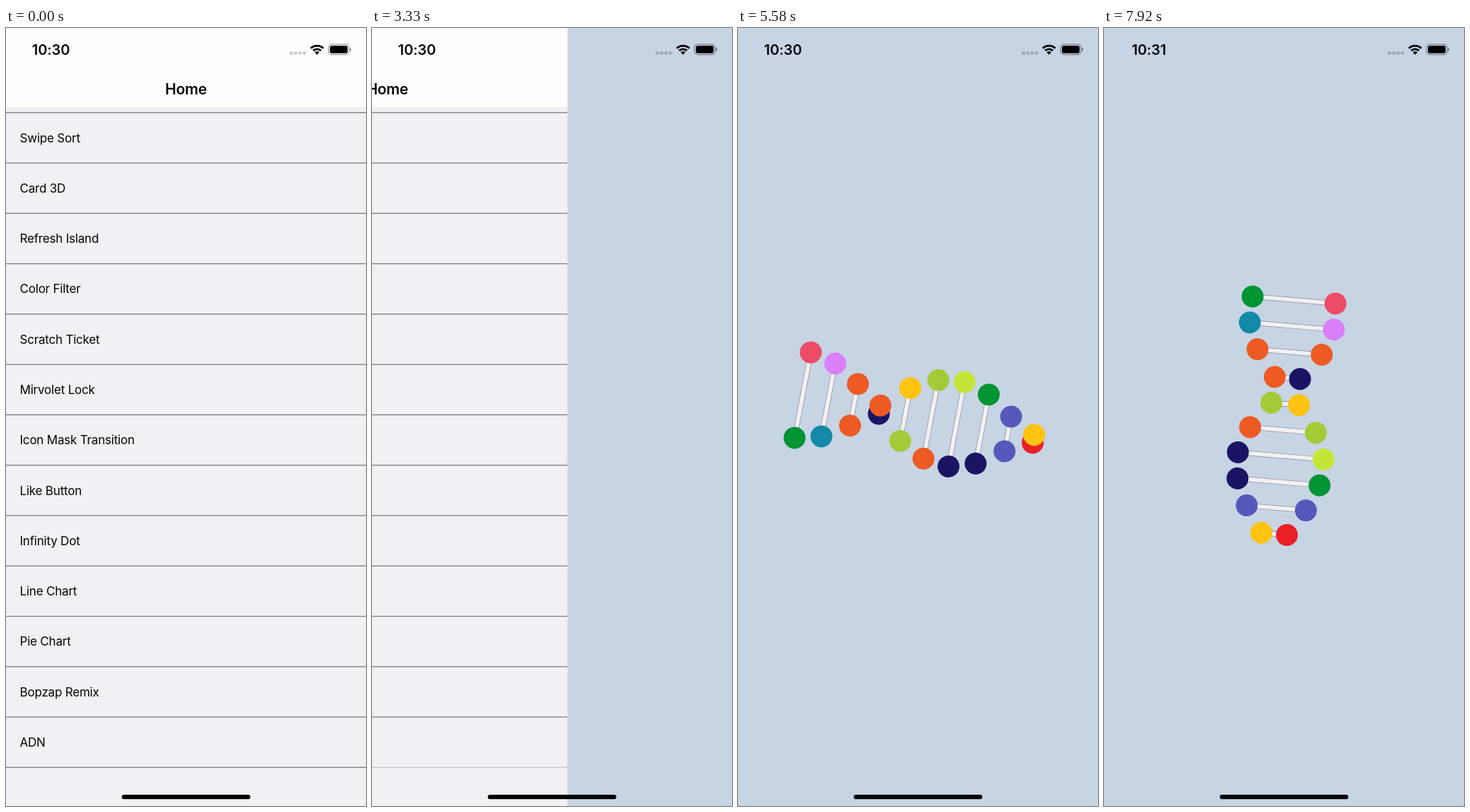
Animation of 509x1101 px, one loop 8 s. Source, as an HTML page with a canvas:

```html
<!DOCTYPE html>
<html lang="en">
<head>
<meta charset="utf-8">
<title>Helix</title>
<style>
  html, body { margin: 0; width: 100%; height: 100%; overflow: hidden; background: #c7d4e4; }
  canvas { display: block; width: 509px; height: 1101px; }
</style>
</head>
<body>
<canvas id="stage"></canvas>
<script>
const W = 509, H = 1101, LOOP = 8000;
const canvas = document.getElementById('stage');
const ctx = canvas.getContext('2d');
const dpr = window.devicePixelRatio || 1;
canvas.width = W * dpr;
canvas.height = H * dpr;

const FONT = 'Inter, "Liberation Sans", sans-serif';
const BLUE = '#c7d4e4';
const ROWS = ['Swipe Sort', 'Card 3D', 'Refresh Island', 'Color Filter', 'Scratch Ticket',
  'Mirvolet Lock', 'Icon Mask Transition', 'Like Button', 'Infinity Dot', 'Line Chart',
  'Pie Chart', 'Bopzap Remix', 'ADN'];
const ROW_TOP = 119.7, ROW_H = 71.28;

const C = {
  pink: '#ed4c67', green: '#009432', violet: '#d980fa', teal: '#1289a7', orange: '#ee5a24',
  navy: '#1b1464', yellow: '#ffc312', lime: '#a3cb38', acid: '#c4e538', purple: '#5758bb', red: '#ea2027'
};
// Each rung: first dot, second dot, time its swing begins (ms)
const RUNGS = [
  [C.pink, C.green, 3780], [C.violet, C.teal, 3664], [C.orange, C.orange, 3564],
  [C.navy, C.orange, 3464], [C.lime, C.yellow, 3364], [C.orange, C.lime, 3264],
  [C.navy, C.acid, 3147], [C.navy, C.green, 3047], [C.purple, C.purple, 2947],
  [C.yellow, C.red, 2864]
];
const SWING = 600.6, REACH = 61.5, GAP = 36.9, DOT = 15.5;

const clamp = x => Math.min(1, Math.max(0, x));
const smooth = x => { x = clamp(x); return x * x * (3 - 2 * x); };
const ramp = (t, a, b) => clamp((t - a) / (b - a));
const easeQuad = x => x < 0.5 ? 2 * x * x : 1 - 2 * (1 - x) * (1 - x);

function rect(x, y, w, h, color) {
  ctx.fillStyle = color;
  ctx.fillRect(x, y, w, h);
}

function pill(x, y, w, h, r, color) {
  ctx.fillStyle = color;
  ctx.beginPath();
  ctx.roundRect(x, y, w, h, r);
  ctx.fill();
}

function text(str, x, y, size, weight, align, spacing) {
  ctx.font = `${weight} ${size}px ${FONT}`;
  ctx.letterSpacing = spacing + 'px';
  ctx.textAlign = align;
  ctx.fillStyle = '#050507';
  ctx.fillText(str, x, y);
}

function disc(x, y, color) {
  ctx.fillStyle = color;
  ctx.beginPath();
  ctx.arc(x, y, DOT, 0, Math.PI * 2);
  ctx.fill();
}

// Pull past the end of the list, then spring back
function overscroll(t) {
  if (t < 880 || t > 1740) return 0;
  if (t < 1290) return 31 * smooth((t - 880) / 390);
  const x = (t - 1290) / 85;
  return 31 * (1 + x) * Math.exp(-x);
}

function drawList(t) {
  const off = overscroll(t);
  const press = 1 - 0.62 * ramp(t, 2720, 3080);
  rect(0, 0, W, H, '#f1f0f4');

  ctx.save();
  ctx.beginPath();
  ctx.rect(0, 113, W, H - 113);
  ctx.clip();
  rect(0, ROW_TOP - 0.6 - off, W, 1.3, '#7c7c80');
  ROWS.forEach((name, i) => {
    const y = ROW_TOP + i * ROW_H - off;
    ctx.globalAlpha = i === ROWS.length - 1 ? press : 1;
    text(name, 19.5, y + ROW_H / 2 + 6.3, 17, 400, 'left', -0.2);
    rect(0, y + ROW_H - 0.6, W, 1.3, '#7c7c80');
  });
  ctx.globalAlpha = ramp(t, 880, 960) * (1 - ramp(t, 2710, 3060));
  const top = 377 + off;
  pill(501.4, top, 4, 1054 - top, 2, 'rgba(0,0,0,0.36)');
  ctx.restore();

  rect(0, 0, W, 113, '#fefefe');
  rect(0, 112.6, W, 0.8, '#d9d9dc');
  text('Home', W / 2, 94, 21, 600, 'center', -0.25);
}

function drawHelix(t) {
  ctx.save();
  ctx.translate(254.6, 550.4);
  ctx.rotate((-90 + 0.03596 * (t - 2780)) * Math.PI / 180);
  RUNGS.forEach(([a, b, start], i) => {
    const x = (i - 4.5) * GAP;
    const u = 1 + Math.max(0, t - start) / SWING;
    const phase = u % 2;
    const y = REACH * (2 * easeQuad(phase > 1 ? 2 - phase : phase) - 1);
    const len = Math.abs(y) * 2;
    rect(x - 3.6, -len / 2, 7.2, len, '#88888e');
    rect(x - 2.9, -len / 2, 5.8, len, '#f1f1f5');
    const dots = [[y, a], [-y, b]];
    if (phase >= 1) dots.reverse();
    dots.forEach(([dy, color]) => disc(x, dy, color));
  });
  ctx.restore();
}

function drawStatus(t) {
  text(t < 7660 ? '10:30' : '10:31', 63.5, 37.8, 20, 600, 'center', -0.1);

  for (let i = 0; i < 4; i++) pill(401.2 + i * 6.15, 33.2, 4.6, 4.6, 1.4, 'rgba(0,0,0,0.2)');

  const a = -Math.PI * 0.75, b = -Math.PI * 0.25;
  ctx.strokeStyle = ctx.fillStyle = '#000';
  for (const [r, w] of [[12.5, 2.9], [7.8, 2.8]]) {
    ctx.lineWidth = w;
    ctx.beginPath();
    ctx.arc(439.8, 37.6, r, a, b);
    ctx.stroke();
  }
  ctx.beginPath();
  ctx.moveTo(439.8, 37.9);
  ctx.arc(439.8, 37.6, 4.6, a, b);
  ctx.fill();

  ctx.strokeStyle = 'rgba(0,0,0,0.42)';
  ctx.lineWidth = 1.3;
  ctx.beginPath();
  ctx.roundRect(456, 23.1, 29, 14.6, 4.4);
  ctx.stroke();
  pill(458, 25.1, 25, 10.6, 2.8, '#000');
  pill(486.4, 28, 1.7, 5, [0, 2, 2, 0], 'rgba(0,0,0,0.45)');

  pill(163.7, 1085, 181.7, 6.3, 3.15, '#000');
}

function draw(t) {
  ctx.setTransform(dpr, 0, 0, dpr, 0, 0);
  rect(0, 0, W, H, BLUE);
  const slide = smooth((t - 3166) / 350);

  if (t >= 3500) {
    ctx.save();
    ctx.translate((1 - slide) * W, 0);
    drawHelix(t);
    ctx.restore();
  }
  if (slide < 1) {
    ctx.save();
    ctx.translate(-slide * W, 0);
    drawList(t);
    ctx.restore();
  }
  drawStatus(t);
}

const begin = performance.now();
function tick() {
  draw((performance.now() - begin) % LOOP);
  requestAnimationFrame(tick);
}
tick();
</script>
</body>
</html>
```
